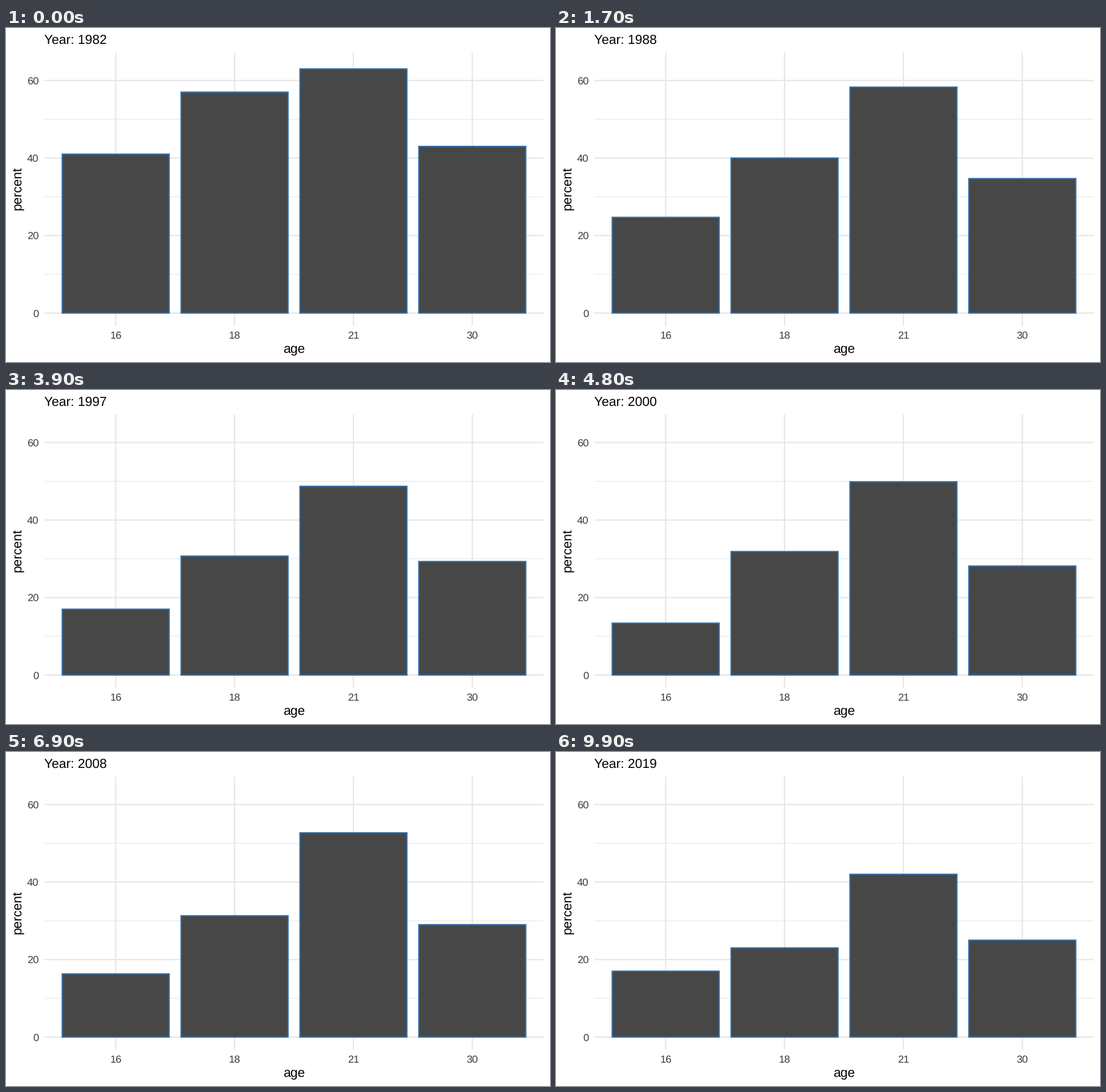
Animation of 954x587 px, one loop 10 s. Source, as a matplotlib script:

```python
import numpy as np
import matplotlib.pyplot as plt
from matplotlib.animation import FuncAnimation
from matplotlib.patches import Rectangle

W, H, DPI = 954, 587, 150
FRAMES, INTERVAL = 100, 100
FIRST, LAST = 1982, 2019

GRID, FILL, EDGE, LABEL = "#e6e6e6", "#474747", "#3570a7", "#3c3c3c"
LEFT, RIGHT, TOP, BOTTOM = 67.3, 942.8, 43.4, 522.8
ZERO, UNIT = 501.0, 6.812
STEP = (RIGHT - LEFT) / 4.2
MID_X, MID_Y = (LEFT + RIGHT) / 2, (TOP + BOTTOM) / 2
LINE = 2.22

plt.rcParams.update({"font.family": "Liberation Sans", "text.hinting": "none"})

# Turning points: percent per age at a few moments, linear in between.
SECONDS = [0, 1.1, 1.7, 3.3, 3.9, 4.9, 5.8, 6.9, 8.1, 8.5, 9.9]
PERCENT = {
    16: [41, 27, 24.7, 16, 17, 13, 15.3, 16.3, 10, 13.3, 17],
    18: [57, 45, 40, 33, 30.7, 32, 30.3, 31.3, 28.5, 28, 23],
    21: [63, 60, 58.3, 52, 48.7, 50, 48, 52.7, 50, 47.7, 42],
    30: [43, 37, 34.7, 30.5, 29.3, 28, 27.3, 29, 28, 27.3, 25],
}


def pt(px):
    return px * 72 / DPI


def y_of(value):
    return ZERO - UNIT * value


fig = plt.figure(figsize=(W / DPI, H / DPI), dpi=DPI, facecolor="white")
ax = fig.add_axes([0, 0, 1, 1])
ax.set(xlim=(0, W), ylim=(H, 0))
ax.axis("off")


def grid_line(xs, ys, width):
    ax.plot(xs, ys, color=GRID, lw=pt(width), solid_capstyle="butt",
            snap=False, zorder=1)


def title_text(x, y, text, **kw):
    return ax.text(x, y, text, fontsize=11, color="black", **kw)


def tick_text(x, y, value, ha):
    ax.text(x, y, str(value), fontsize=8.8, color=LABEL, ha=ha)


for value in (10, 30, 50):
    grid_line((LEFT, RIGHT), (y_of(value),) * 2, LINE / 2)
for value in (0, 20, 40, 60):
    grid_line((LEFT, RIGHT), (y_of(value),) * 2, LINE)
    tick_text(57.5, y_of(value) + 6.5, value, "right")

bars = {}
for i, age in enumerate(PERCENT):
    x = LEFT + (i + 0.6) * STEP
    grid_line((x, x), (TOP, BOTTOM), LINE)
    tick_text(x, 546, age, "center")
    bars[age] = ax.add_patch(Rectangle(
        (x - 0.45 * STEP, ZERO), 0.9 * STEP, 0, facecolor=FILL, edgecolor=EDGE,
        lw=pt(LINE), joinstyle="miter", snap=False, zorder=2))

title_text(MID_X - 0.3, 571.5, "age", ha="center")
title_text(20.6, MID_Y - 1.5, "percent", rotation=90, ha="center", va="center")
title = title_text(LEFT, 28, "")


def draw(frame):
    seconds = frame * INTERVAL / 1000
    for age, bar in bars.items():
        bar.set_height(-UNIT * np.interp(seconds, SECONDS, PERCENT[age]))
    year = FIRST + (LAST - FIRST) * frame / (FRAMES - 1)
    title.set_text(f"Year: {round(year)}")
    return [*bars.values(), title]


anim = FuncAnimation(fig, draw, frames=FRAMES, interval=INTERVAL,
                     repeat=True, repeat_delay=0)
plt.show()
```
